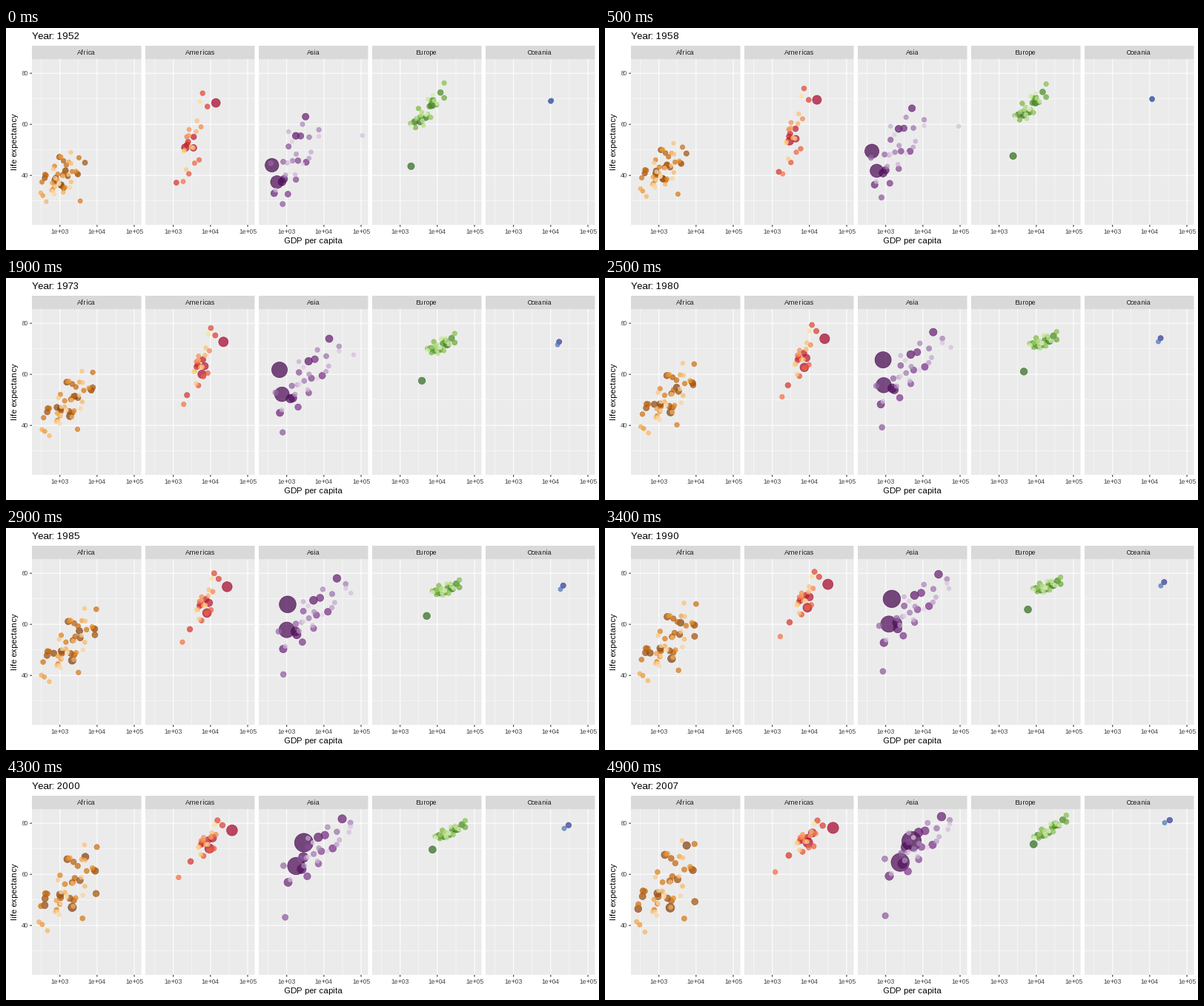
These frames come from a looping animation (800 by 300 pixels, 5000 ms). A matplotlib script:

```python
import matplotlib.pyplot as plt
import numpy as np
from matplotlib.animation import FuncAnimation
from matplotlib.colors import LinearSegmentedColormap
from matplotlib.patches import Rectangle

FRAMES, INTERVAL = 50, 100
FIRST, MIDDLE, LAST = 1952, 1977, 2007
PX = 0.72  # points per pixel at 100 dpi
LEFT, PITCH, WIDTH = 35, 153, 147.5
STRIP_TOP, TOP, BOTTOM = 24, 42, 266
X_MIN, X_MAX = 2.2487, 5.1888
Y_MIN, Y_MAX = 20.65, 85.55
MAX_POP = 1318

# leaders: population in millions, then (income, life) at the three key years.
# cloud: log-income centre and spread, life centre, slope and scatter at those
# years, shared by all the other dots of the region.
REGIONS = {
    "Africa": dict(
        colors=["#7F3B08", "#B35806", "#E08214", "#FDB863", "#FEE0B6"],
        growth=0.27, others=47, pops=(76, 0.6), seed=4,
        leaders=[(135, (1077, 36.3), (1982, 44.5), (2014, 46.9)),
                 (80, (1419, 41.9), (2785, 53.3), (5581, 71.3)),
                 (65, (781, 39.1), (796, 47.8), (278, 46.5)),
                 (44, (4725, 45), (8028, 55.5), (9270, 49.3)),
                 (12, (3521, 30), (3009, 39.5), (4797, 42.7))],
        cloud=[(3.0, 0.27, 39.3, 6, 4.2),
               (3.22, 0.37, 50, 11, 4.5),
               (3.18, 0.41, 55.5, 12, 6.5)]),
    "Americas": dict(
        colors=["#A50026", "#D73027", "#F46D43", "#FDAE61", "#FEE090"],
        growth=0.45, others=21, pops=(44, 1.1), seed=2,
        leaders=[(301, (13990, 68.4), (24073, 73.4), (42952, 78.2)),
                 (190, (2109, 50.9), (6660, 61.5), (9066, 72.4)),
                 (109, (3478, 50.8), (7675, 65), (11978, 76.2)),
                 (8.5, (1840, 37.6), (1874, 49.9), (1202, 60.9))],
        cloud=[(3.5, 0.22, 53.5, 22, 6.5),
               (3.78, 0.2, 66, 20, 4),
               (3.9, 0.24, 73.8, 8, 2.5)]),
    "Asia": dict(
        colors=["#40004B", "#762A83", "#9970AB", "#C2A5CF", "#E7D4E8"],
        growth=0.4, others=27, pops=(170, 1.2), seed=9,
        leaders=[(1318, (400, 44), (741, 64), (4959, 73)),
                 (1110, (547, 37.4), (813, 54.2), (2452, 64.7)),
                 (223, (750, 37.5), (1383, 52.7), (3541, 70.6)),
                 (127, (3217, 63), (16610, 75.4), (31656, 82.6)),
                 (32, (779, 28.8), (786, 38.4), (975, 43.8)),
                 (2.5, (108382, 55.6), (59265, 69.3), (47307, 77.6))],
        cloud=[(3.22, 0.34, 47, 13, 6.5),
               (3.6, 0.46, 60.5, 12, 4.5),
               (3.85, 0.46, 71, 10, 4)]),
    "Europe": dict(
        colors=["#276419", "#4D9221", "#7FBC41", "#B8E186", "#E6F5D0"],
        growth=0.72, others=28, pops=(61, 0.7), seed=5,
        leaders=[(82, (7144, 67.5), (20513, 72.5), (32170, 79.4)),
                 (71, (1969, 43.6), (4269, 59.5), (8458, 71.8))],
        cloud=[(3.71, 0.25, 65.3, 16, 2.3),
               (4.13, 0.2, 72.2, 6, 1.3),
               (4.35, 0.24, 77.6, 9, 1)]),
    "Oceania": dict(
        colors=["#313695", "#4575B4"], growth=0.45,
        leaders=[(20.4, (10040, 69.1), (18334, 73.5), (34435, 81.2)),
                 (4.1, (10557, 69.4), (16234, 72.2), (25185, 80.2))]),
}

plt.rcParams.update({"font.family": "Liberation Sans",
                     "text.hinting": "force_autohint",
                     "text.hinting_factor": 1})


def x_px(panel, log_income):
    return LEFT + panel * PITCH + (log_income - X_MIN) / (X_MAX - X_MIN) * WIDTH


def y_px(life):
    return TOP + (Y_MAX - life) / (Y_MAX - Y_MIN) * (BOTTOM - TOP)


def through_keys(keys, year):
    """Quadratic path through the values at the three key years."""
    a, b, c = year - FIRST, year - MIDDLE, year - LAST
    first, mid, last = MIDDLE - FIRST, LAST - MIDDLE, LAST - FIRST
    return (keys[0] * b * c / (first * last) - keys[1] * a * c / (first * mid)
            + keys[2] * a * b / (last * mid))


def scatter_scores(rng, count):
    scores = rng.standard_normal(count)
    return np.clip((scores - scores.mean()) / scores.std(), -1.9, 1.9)


class Region:
    def __init__(self, panel, name, spec):
        self.panel, self.growth = panel, spec["growth"]
        pops = np.array([leader[0] for leader in spec["leaders"]], float)
        keys = np.array([leader[1:] for leader in spec["leaders"]], float)
        keys[..., 0] = np.log10(keys[..., 0])
        if "cloud" in spec:
            count = spec["others"]
            rng = np.random.default_rng(spec["seed"])
            wealth, health = scatter_scores(rng, count), scatter_scores(rng, count)
            places = [np.column_stack([
                centre + spread * wealth,
                life + slope * spread * wealth + scatter * health])
                for centre, spread, life, slope, scatter in spec["cloud"]]
            keys = np.concatenate([keys, np.stack(places, axis=1)])
            pops = np.concatenate([pops, np.geomspace(*spec["pops"], count)])

        # Larger populations are darker and lie underneath.
        order = np.argsort(-pops)
        self.pops = pops[order]
        self.keys = keys[order].transpose(1, 0, 2)
        ramp = LinearSegmentedColormap.from_list(name, spec["colors"])
        blank = np.zeros(len(pops))
        self.dots = ax.scatter(blank, blank, alpha=0.7, linewidths=0.71 * PX,
                               c=ramp(np.linspace(0, 1, len(pops))), zorder=3)

    def update(self, year):
        log_income, life = through_keys(self.keys, year).T
        pops = self.pops * self.growth ** ((LAST - year) / (LAST - FIRST))
        size = 2 + 10 * np.sqrt(pops / MAX_POP)
        diameter = 0.75 * (2.845 * size + 0.945)
        self.dots.set_offsets(np.column_stack(
            [x_px(self.panel, log_income), y_px(life)]))
        self.dots.set_sizes((diameter * PX) ** 2)


def label(x, y, text, size, color="black", ha="center", **kw):
    return ax.text(x, y, text, fontsize=size * PX, color=color, ha=ha,
                   va="baseline", **kw)


def line(xs, ys, color, width):
    ax.plot(xs, ys, color=color, lw=width * PX, zorder=2,
            solid_capstyle="butt", snap=False)


def box(x, y, height, color):
    ax.add_patch(Rectangle((x, y), WIDTH, height, fc=color, lw=0, snap=False))


def draw_panel(panel, name):
    x = LEFT + panel * PITCH
    box(x, STRIP_TOP, TOP - STRIP_TOP, "#D9D9D9")
    box(x, TOP, BOTTOM - TOP, "#EBEBEB")
    label(x + WIDTH / 2, 36.2, name, 8.8, "#1A1A1A")
    for life in range(30, 90, 10):
        y = y_px(life)
        line([x, x + WIDTH], [y, y], "white", 0.53 if life % 20 else 1.07)
    for half_power in range(5, 11):
        gx = x_px(panel, half_power / 2)
        major = half_power % 2 == 0
        line([gx, gx], [TOP, BOTTOM], "white", 1.07 if major else 0.53)
        if major:
            line([gx, gx], [BOTTOM, BOTTOM + 2.75], "#333333", 1.07)
            label(gx, 278, f"1e+0{half_power // 2}", 8.8, "#4D4D4D")


fig = plt.figure(figsize=(8, 3), dpi=100, facecolor="white")
ax = fig.add_axes([0, 0, 1, 1])
ax.set(xlim=(0, 800), ylim=(300, 0))
ax.set_autoscale_on(False)
ax.axis("off")

title = label(LEFT, 15, "", 13.2, ha="left")
label(414.7, 291.4, "GDP per capita", 11)
label(14.7, 154, "life expectancy", 11, rotation=90, rotation_mode="anchor")
for tick in (40, 60, 80):
    ty = y_px(tick)
    line([LEFT - 2.75, LEFT], [ty, ty], "#333333", 1.07)
    label(LEFT - 4.95, ty + 3.15, str(tick), 8.8, "#4D4D4D", ha="right")

regions = []
for index, (region_name, region_spec) in enumerate(REGIONS.items()):
    draw_panel(index, region_name)
    regions.append(Region(index, region_name, region_spec))


def update(frame):
    year = FIRST + (LAST - FIRST) * frame / (FRAMES - 1)
    title.set_text(f"Year: {round(year)}")
    for region in regions:
        region.update(year)
    return [title] + [region.dots for region in regions]


animation = FuncAnimation(fig, update, frames=FRAMES, interval=INTERVAL,
                          repeat=True, repeat_delay=0)
plt.show()
```
